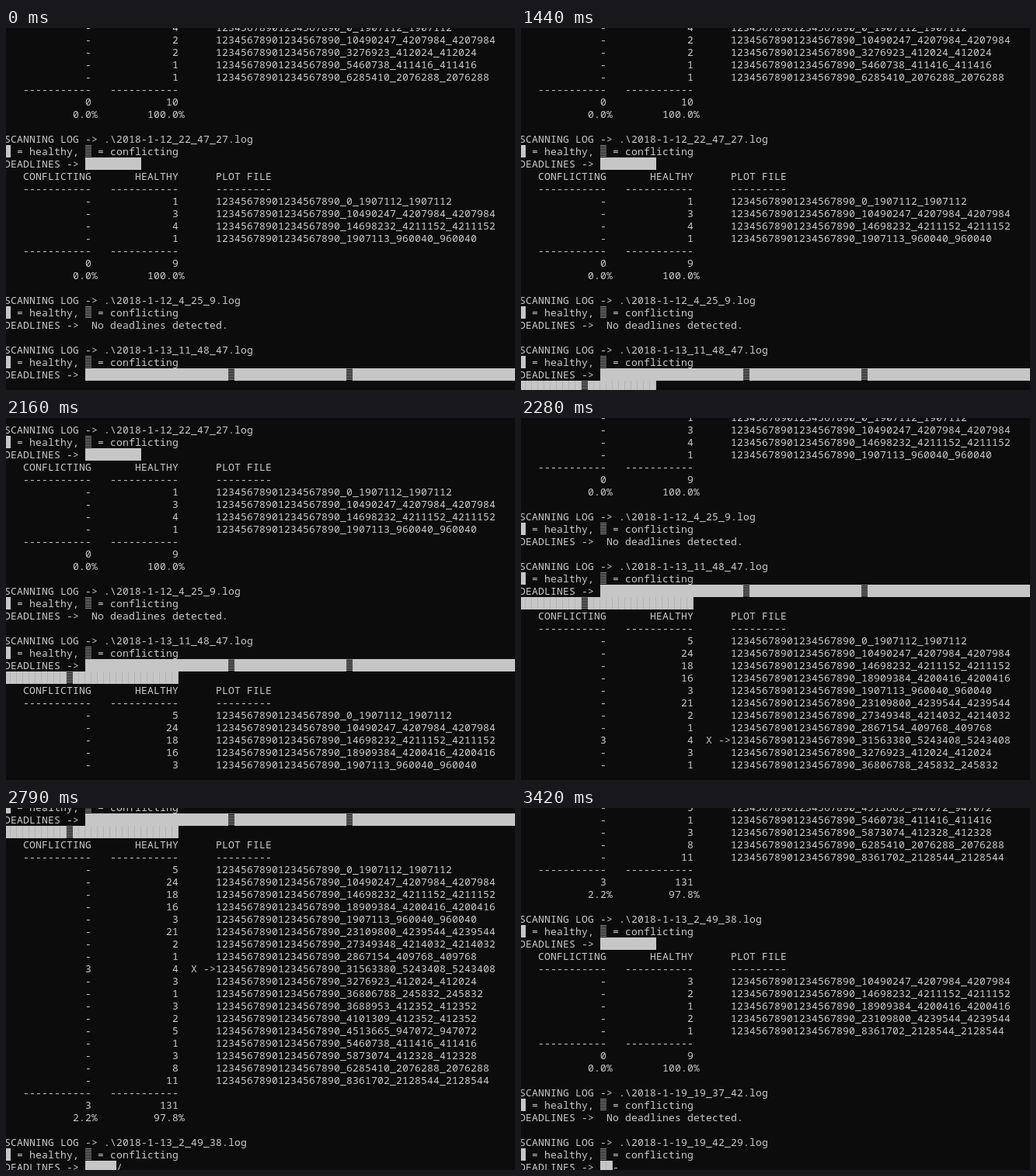
These frames come from a looping animation (655x467 px, 3.45 s). An HTML page with a canvas:

```html
<!DOCTYPE html>
<html>
<head>
<meta charset="utf-8">
<style>
html, body { margin: 0; width: 100%; height: 100%; overflow: hidden; background: #0c0c0c; }
canvas { display: block; }
</style>
</head>
<body>
<canvas id="screen" width="655" height="467"></canvas>
<script>
const ctx = document.getElementById('screen').getContext('2d');
const LOOP = 3450, STEP = 30, CELL_W = 8, CELL_H = 16, LEFT = -2, TOP = -9, LAST = 29;
const BG = '#0c0c0c', FG = '#cccccc', BLOCK = '#c6c6c6', SEAM = '#b4b4b4', SHADE = '#8c8c8c';

// Log contents, one string per terminal row
const columns = (a, b) => String(a).padStart(14) + String(b).padStart(14);
const dashes = columns('-'.repeat(11), '-'.repeat(11));
const entry = (healthy, plot, bad = '-') => {
  const [start, size] = plot.split('_');
  return columns(bad, healthy) + (bad === '-' ? '      ' : '  X ->') +
    `12345678901234567890_${start}_${size}_${size}`;
};
const entries = list => list.split(' ').map(item => entry(...item.split(':')));
const totals = (bad, good, badPct, goodPct) =>
  [dashes, columns(bad, good), ' ' + columns(badPct, goodPct), ''];
const header = [columns('CONFLICTING', 'HEALTHY') + '      PLOT FILE', dashes + '      ---------'];
const scan = (stamp, result) =>
  [`SCANNING LOG -> .\\2018-1-${stamp}.log`, '█ = healthy, ▒ = conflicting', 'DEADLINES -> ' + result];
const none = [' No deadlines detected.'];
const bar = n => '█'.repeat(n), seamed = n => '▓'.repeat(n);

const rows = [
  ...entries('4:0_1907112 2:10490247_4207984 2:3276923_412024 1:5460738_411416 1:6285410_2076288'),
  ...totals(0, 10, '0.0%', '100.0%'),
  ...scan('12_22_47_27', bar(9)), ...header,
  ...entries('1:0_1907112 3:10490247_4207984 4:14698232_4211152 1:1907113_960040'),
  ...totals(0, 9, '0.0%', '100.0%'),
  ...scan('12_4_25_9', none), '',
  ...scan('13_11_48_47', bar(23) + '▒' + bar(18) + '▒' + bar(27)),
  seamed(10) + '▒' + seamed(17), ...header,
  ...entries('5:0_1907112 24:10490247_4207984 18:14698232_4211152 16:18909384_4200416 ' +
    '3:1907113_960040 21:23109800_4239544 2:27349348_4214032 1:2867154_409768 ' +
    '4:31563380_5243408:3 3:3276923_412024 1:36806788_245832 3:3688953_412352 ' +
    '2:4101309_412352 5:4513665_947072 1:5460738_411416 3:5873074_412328 ' +
    '8:6285410_2076288 11:8361702_2128544'),
  ...totals(3, 131, '2.2%', '97.8%'),
  ...scan('13_2_49_38', bar(9)), ...header,
  ...entries('3:10490247_4207984 2:14698232_4211152 1:18909384_4200416 2:23109800_4239544 1:8361702_2128544'),
  ...totals(0, 9, '0.0%', '100.0%'),
  ...scan('19_19_37_42', none), '',
  ...scan('19_19_42_29', seamed(3))
];

// [time, value] keys, linear in between
const cursorRow = [[0, 29], [2018, 30], [2538, 56], [2935, 57], [3265, 74], [4000, 74.9]];
const typedCells = {
  29: [[0, 0], [540, 11.4], [1080, 20.4], [1440, 22.3], [1620, 24.3], [2018, 28]],
  56: [[2538, 13], [2935, 22]],
  74: [[3265, 13], [3300, 13.2], [3400, 15.2], [3450, 15.6]]
};
function valueAt(keys, t) {
  const i = Math.max(1, keys.findIndex(k => t < k[0]));
  const [t0, v0] = keys[i - 1], [t1, v1] = keys[i];
  return v0 + (v1 - v0) * (t - t0) / (t1 - t0);
}

function rect(color, x, y, w, h) {
  ctx.fillStyle = color;
  ctx.fillRect(x, y, w, h);
}

function drawCell(ch, x, y) {
  if (ch === '█' || ch === '▓') {
    rect(BLOCK, x, y, CELL_W, CELL_H);
    if (ch === '▓') rect(SEAM, x + CELL_W - 1, y, 1, CELL_H);
  } else if (ch === '▒') {
    for (let dy = 0; dy < CELL_H; dy += 2) rect(SHADE, x, y + dy, CELL_W, 1);
  } else if (ch !== ' ') {
    ctx.fillStyle = FG;
    ctx.fillText(ch, x, y + 13);
  }
}

// The row under the cursor is still being written
function currentText(row, progress, t) {
  const text = rows[row];
  if (typedCells[row]) {
    const spinner = ' /-\\'[t / STEP % 4];
    return text.slice(0, Math.floor(valueAt(typedCells[row], t))) + spinner;
  }
  const part = Math.max(0, (progress - row - 0.6) / 0.4);
  return text.slice(0, Math.round(part * text.length));
}

function draw(now) {
  const t = Math.floor((now % LOOP + 1) / STEP) * STEP % LOOP;
  const progress = valueAt(cursorRow, t), current = Math.floor(progress);
  rect(BG, 0, 0, 655, 467);
  ctx.font = '13px "Noto Sans Mono", monospace';
  for (let i = 0; i <= LAST; i++) {
    const row = current - LAST + i;
    const text = row === current ? currentText(row, progress, t) : rows[row];
    [...text].forEach((ch, col) => drawCell(ch, LEFT + col * CELL_W, TOP + i * CELL_H));
  }
}

const start = performance.now();
function tick() {
  draw(performance.now() - start);
  requestAnimationFrame(tick);
}
tick();
</script>
</body>
</html>
```
